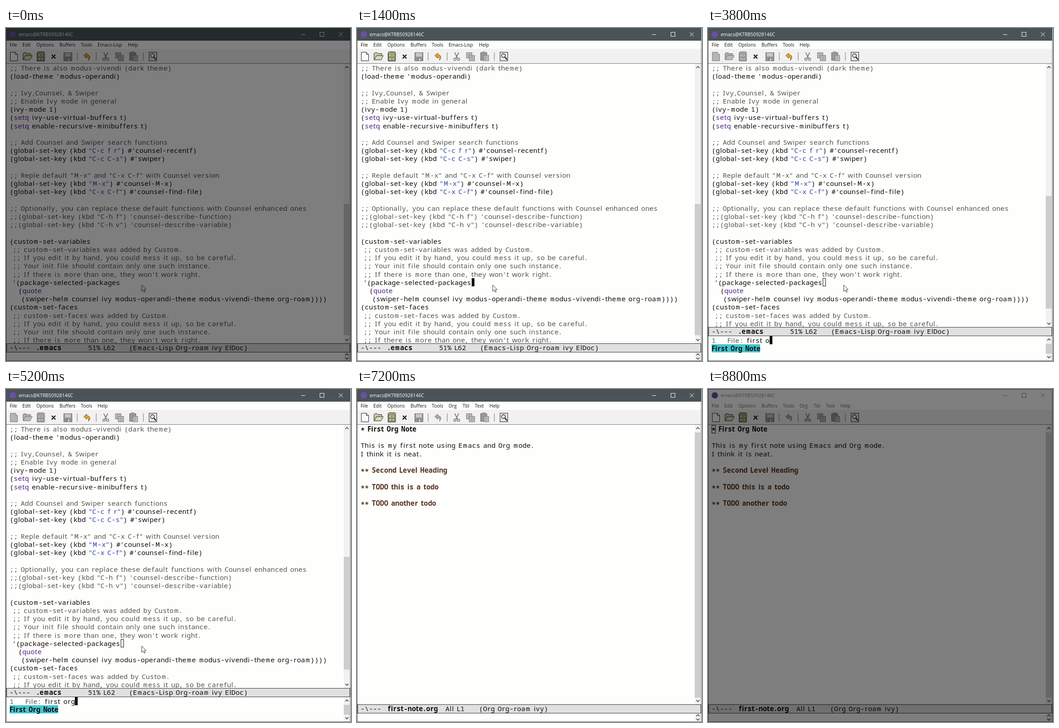
An HTML page with a canvas that plays this animation: 761 by 736 pixels, repeating every 9000 ms.

```html
<!DOCTYPE html>
<html lang="en">
<head>
<meta charset="utf-8">
<title>Finding a note</title>
<style>
  html, body { margin: 0; width: 100%; height: 100%; overflow: hidden; background: #fff; }
  canvas { display: block; }
</style>
</head>
<body>
<canvas id="stage" width="761" height="736"></canvas>
<script>
const ctx = document.getElementById('stage').getContext('2d');
const LOOP = 9000, TICK = 200, ROW = 18.22, LEFT = 8;
const INK = '#111', GRAY = '#5a554e', PURPLE = '#51268c', BLUE = '#3148a8', BROWN = '#57321f', CYAN = '#43c6d0';

const INIT_FILE = `;; There is also modus-vivendi (dark theme)
(load-theme 'modus-operandi)

;; Ivy,Counsel, & Swiper
;; Enable Ivy mode in general
(ivy-mode 1)
(setq ivy-use-virtual-buffers t)
(setq enable-recursive-minibuffers t)

;; Add Counsel and Swiper search functions
(global-set-key (kbd "C-c f r") #'counsel-recentf)
(global-set-key (kbd "C-c C-s") #'swiper)

;; Reple default "M-x" and "C-x C-f" with Counsel version
(global-set-key (kbd "M-x") #'counsel-M-x)
(global-set-key (kbd "C-x C-f") #'counsel-find-file)

;; Optionally, you can replace these default functions with Counsel enhanced ones
;;(global-set-key (kbd "C-h f") 'counsel-describe-function)
;;(global-set-key (kbd "C-h v") 'counsel-describe-variable)

(custom-set-variables
 ;; custom-set-variables was added by Custom.
 ;; If you edit it by hand, you could mess it up, so be careful.
 ;; Your init file should contain only one such instance.
 ;; If there is more than one, they won't work right.
 '(package-selected-packages
   (quote
    (swiper-helm counsel ivy modus-operandi-theme modus-vivendi-theme org-roam))))
(custom-set-faces
 ;; custom-set-faces was added by Custom.
 ;; If you edit it by hand, you could mess it up, so be careful.
 ;; Your init file should contain only one such instance.
 ;; If there is more than one, they won't work right.`.split('\n');

const NOTE = `* First Org Note

This is my first note using Emacs and Org mode.
I think it is neat.

** Second Level Heading

** TODO this is a todo

** TODO another todo`.split('\n');

const MENUS = {
  init: [['File', 8], ['Edit', 36], ['Options', 67], ['Buffers', 118], ['Tools', 165], ['Emacs-Lisp', 202], ['Help', 269]],
  mini: [['File', 8], ['Edit', 36], ['Options', 67], ['Buffers', 118], ['Tools', 165], ['Help', 202]],
  note: [['File', 8], ['Edit', 36], ['Options', 67], ['Buffers', 118], ['Tools', 165], ['Org', 202], ['Tbl', 233], ['Text', 260], ['Help', 292]]
};

// Each step overrides part of the state before it.
const STEPS = [
  [0, { view: 'init', dim: true, cursor: false, focus: true, typed: '' }],
  [200, { dim: false }],
  [400, { cursor: true }],
  [800, { cursor: false }],
  [1200, { cursor: true }],
  [1600, { view: 'mini' }],
  [2200, { cursor: false }],
  [2600, { typed: 'f', cursor: true }],
  [2800, { typed: 'fir' }],
  [3000, { typed: 'first' }],
  [3200, { typed: 'first ' }],
  [3800, { typed: 'first o' }],
  [4000, { typed: 'first or' }],
  [4200, { typed: 'first org' }],
  [4800, { cursor: false }],
  [5200, { cursor: true }],
  [5600, { view: 'note' }],
  [6200, { cursor: false }],
  [6600, { cursor: true }],
  [7200, { cursor: false }],
  [7600, { cursor: true }],
  [8000, { cursor: false }],
  [8200, { focus: false }],
  [8800, { dim: true }]
];
const stateAt = time => Object.assign({}, ...STEPS.filter(([at]) => at <= time).map(([, change]) => change));

// Editor type: a few letter widths, with narrow glyphs from the proportional face.
function advance(c) {
  if ('il'.includes(c)) return 4.9;
  if (' tIj'.includes(c)) return 6.3;
  if (',.'.includes(c)) return 7;
  if (`frFL'"`.includes(c)) return 7.7;
  if ('wmM'.includes(c)) return 11.9;
  return 9.1;
}

function type(text, x, y, color = INK, bold = false) {
  ctx.textAlign = 'center';
  ctx.fillStyle = color;
  for (const c of text) {
    const width = advance(c);
    const family = width < 8 || c === 'w' ? '"Noto Sans", sans-serif' : '"Noto Sans Mono", monospace';
    ctx.font = `${bold ? 'bold ' : ''}15.2px ${family}`;
    ctx.fillText(c, x + width / 2, y + (c === '*' ? 3 : 0));
    x += width;
  }
  return x;
}

function label(text, x, y, color) {
  ctx.textAlign = 'left';
  ctx.font = '10.4px "Open Sans", sans-serif';
  ctx.fillStyle = color;
  ctx.fillText(text, x, y);
}

function box(x, y, w, h, fill, stroke) {
  if (fill) { ctx.fillStyle = fill; ctx.fillRect(x, y, w, h); }
  if (stroke) { ctx.strokeStyle = stroke; ctx.lineWidth = 1; ctx.strokeRect(x + .5, y + .5, w - 1, h - 1); }
}

function shape(d, fill, stroke, width = 1) {
  const path = new Path2D(d);
  if (fill) { ctx.fillStyle = fill; ctx.fill(path); }
  if (stroke) { ctx.strokeStyle = stroke; ctx.lineWidth = width; ctx.stroke(path); }
}

function disc(x, y, r, fill, stroke, width = 1) {
  ctx.beginPath();
  ctx.arc(x, y, r, 0, 7);
  if (fill) { ctx.fillStyle = fill; ctx.fill(); }
  if (stroke) { ctx.strokeStyle = stroke; ctx.lineWidth = width; ctx.stroke(); }
}

function titleBar(focus) {
  const ink = focus ? '#fff' : '#8c8c8c';
  box(0, 0, 760, 28, focus ? '#4a5458' : '#fff');
  disc(15, 14, 7, '#6d4fa3');
  label('emacs@KTRB50928146C', 28, 18, ink);
  shape('M651 14.5h9', null, ink);
  box(692, 9, 10, 10, null, ink);
  shape('M734 9.5l9 9m0-9l-9 9', null, ink);
}

function toolBar(view) {
  const files = view !== 'mini', undo = view !== 'note';
  const line = files ? '#222' : '#777';
  box(1, 46, 758, 33, '#f1f1f1');
  shape('M1 78.5h758', null, '#777');

  shape('M9.5 53.5h11l5 5v14h-16zM20.5 53.5v5h5', files ? '#fafafa' : '#b5b5b5', line);
  shape('M37.5 69.5v-13l2-2h5l2 2h8v4', files ? '#c9c9a4' : '#aaa', line);
  shape('M38 70.5l5-9.5h15l-5 9.5z', files ? '#d9d9b8' : '#bbb', line);
  shape('M68.5 54.5l2-2h13l1.5 2v18.5h-16.5z', files ? '#a7a780' : '#a5a5a5', line);
  for (const y of [57, 65]) {
    box(70, y, 13, 7, files ? '#c5c59f' : '#b8b8b8', files ? '#66664c' : '#888');
    shape(`M75 ${y + 3.5}h4`, null, line);
  }
  shape('M101 59l8 8.5m0-8.5l-8.5 8.5', null, '#000', 2);

  box(127, 54, 19, 19, '#999', '#666');
  box(130, 55, 13, 8, '#c7c7c7');
  box(131, 66, 10, 7, '#ccc', '#777');
  box(133, 67, 3, 5, '#777');

  shape('M171.5 61l6.5-5.5v3.5c8 0 9 7 3.5 12.5c2-5 1-7.5-3.5-7.5v3z',
    undo ? '#e5a52d' : '#aaa', undo ? '#704b0b' : '#777');

  shape('M215.5 54l6.5 13m2.5-13l-6.5 13', null, '#777', 1.7);
  disc(216, 69, 2.6, null, '#777', 1.5);
  disc(224, 69, 2.6, null, '#777', 1.5);

  for (const [x, y] of [[241, 54], [247, 60]]) {
    box(x, y, 13, 13, '#bdbdbd', '#777');
    shape(`M${x + 3} ${y + 3.5}h7m-7 3h7m-7 3h7`, null, '#929292');
  }
  box(272, 54, 15, 18, '#999', '#707070');
  box(276, 52, 7, 4, '#bbb', '#777');
  box(279, 60, 12, 13, '#c2c2c2', '#777');
  shape('M281 63.5h7m-7 3h7m-7 3h5', null, '#929292');

  box(315, 53, 18, 20, '#e5e5e5', '#222');
  disc(323, 61, 4, '#fff', '#222', 1.5);
  shape('M326 64l5 6', null, '#222', 2.4);
  for (const x of [157, 199, 303]) shape(`M${x} 54v18`, null, '#999', 1.5);
}

function arrow(y, dir) {
  shape(`M748.5 ${y + dir * -1.5}l3.5 ${dir * 3.5}l3.5 ${dir * -3.5}`, null, '#444', 1.6);
}

function scrollBar(top, bottom, thumbTop, thumbBottom, inset = 8) {
  box(745, top, 14, bottom - top, '#f1f1f1');
  if (thumbBottom) box(745, thumbTop, 13, thumbBottom - thumbTop, '#cdcdcd');
  arrow(top + inset, -1);
  arrow(bottom - inset, 1);
}

function lispLine(text, y) {
  if (text.trim().startsWith(';;')) return type(text, LEFT, y, GRAY);
  let x = LEFT;
  for (const part of text.split(/("[^"]*"|setq|quote)/)) {
    const color = part[0] === '"' ? BLUE : /^(setq|quote)$/.test(part) ? PURPLE : INK;
    x = type(part, x, y, color);
  }
}

function noteLine(text, y) {
  const heading = text[0] === '*';
  type(text, LEFT, y, text.startsWith('**') ? BROWN : INK, heading);
}

function buffer(lines, drawLine, bottom) {
  ctx.save();
  ctx.beginPath();
  ctx.rect(0, 79, 745, bottom - 79);
  ctx.clip();
  lines.forEach((text, i) => drawLine(text, 94 + i * ROW));
  ctx.restore();
}

function modeLine(top, name, place, placeX, modes, modesX) {
  box(1, top, 758, 20, '#e0e0e1', '#333');
  const y = top + 15;
  type('-\\---', LEFT, y);
  type(name, 67, y, INK, true);
  type(place, placeX, y);
  type(modes, modesX, y);
}

function pointer() {
  shape('M299.5 568v14l3.2-3l2.3 5l2.2-1l-2.3-4.8h4.3z', '#fff', '#333');
}

function initView({ view, cursor }) {
  const mini = view === 'mini', bottom = mini ? 661 : 697;
  buffer(INIT_FILE, lispLine, bottom);
  if (mini) box(253, 553, 7, 18, null, '#111');
  else if (cursor) box(253, 553, 6, 18, '#000');
  scrollBar(79, bottom, mini ? 371 : 389, mini ? 620 : 679);
  modeLine(bottom, '.emacs', '51% L62', 181, '(Emacs-Lisp Org-roam ivy ElDoc)', 271);
}

function miniBuffer({ typed, cursor }) {
  const found = typed ? ['First Org Note'] : ['Second Org Note', 'First Org Note'];
  type(String(found.length), LEFT, 695.5, '#3c6c7a');
  const x = type(typed, type('File: ', 42.5, 695.5, '#4d5b60'), 695.5);
  if (cursor) box(Math.round(x), 681, 6, 18, '#000');
  box(8, 699, typed ? 107 : 126, 18, CYAN);
  found.forEach((name, i) => type(name, LEFT, 713.5 + i * ROW, INK, i === 0));
  scrollBar(681, 735, 698, 720);
}

function noteView({ cursor, focus }) {
  buffer(NOTE, noteLine, 697);
  if (!focus) box(8, 80, 9, 18, null, '#111');
  else if (cursor) {
    box(8, 79, 9, 19, '#000');
    type('*', LEFT, 94, '#fff', true);
  }
  scrollBar(79, 697, 96, 682);
  modeLine(697, 'first-note.org', 'All L1', 195, '(Org Org-roam ivy)', 269);
}

function draw(state) {
  const { view, focus, dim } = state;
  box(0, 0, 761, 736, '#fefefd');
  titleBar(focus);
  for (const [name, x] of MENUS[view]) label(name, x, 41, focus ? '#111' : '#666');
  toolBar(view);
  if (view === 'note') noteView(state);
  else initView(state);
  if (view === 'mini') miniBuffer(state);
  else scrollBar(717, 735, 0, 0, 5);
  if (view !== 'note') pointer();
  box(0, 0, 760, 736, null, '#4a5458');
  if (dim) box(0, 0, 761, 736, 'rgba(0,0,0,.5)');
}

let shown = -1;
function frame() {
  const tick = Math.floor(performance.now() % LOOP / TICK);
  if (tick !== shown) draw(stateAt(tick * TICK));
  shown = tick;
  requestAnimationFrame(frame);
}
frame();
</script>
</body>
</html>
```
